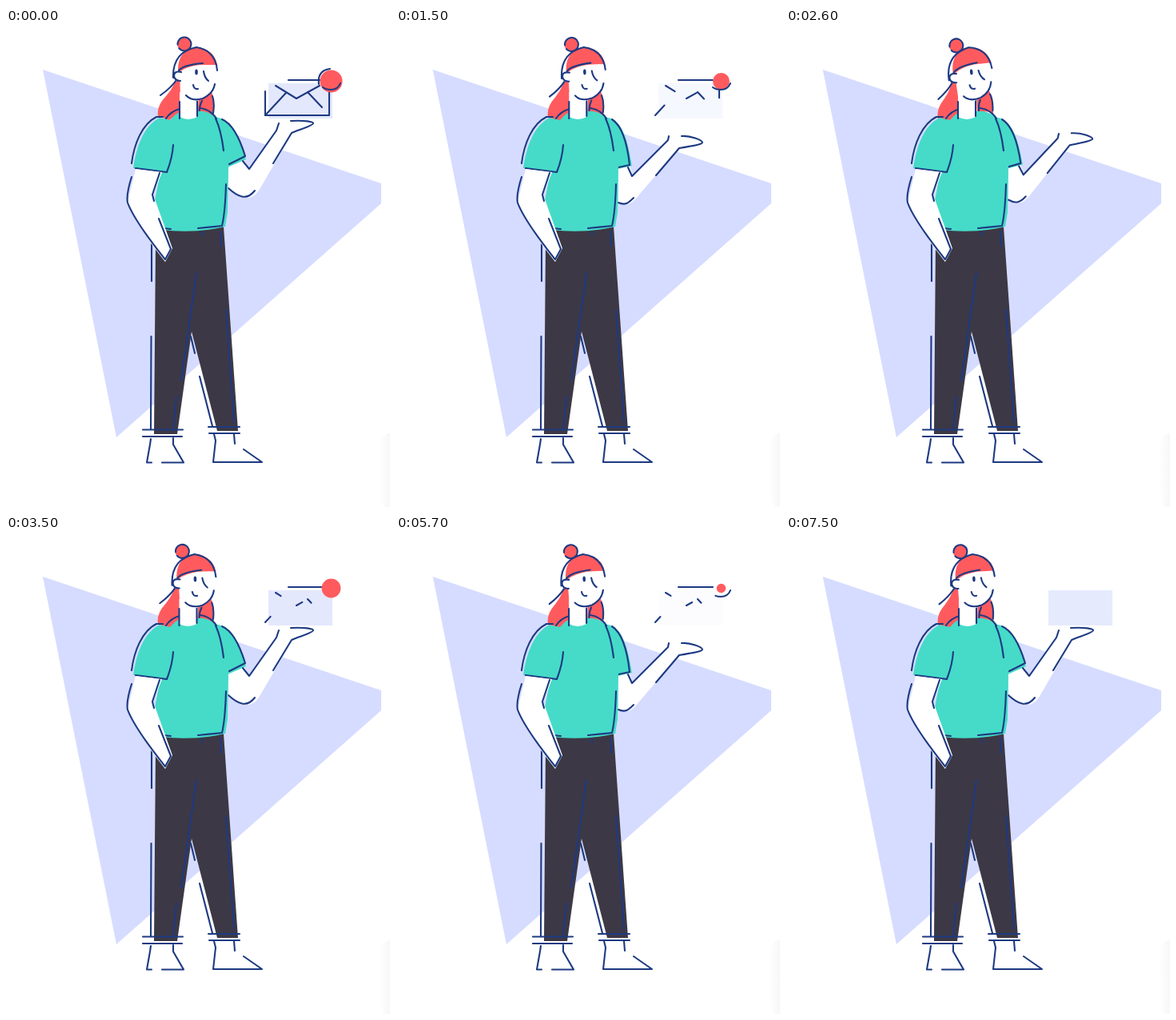
These frames come from a looping animation (480x598 px, 7.6 s). An HTML page:

```html
<!DOCTYPE html>
<html lang="en">
<head>
<meta charset="utf-8">
<title>Message in hand</title>
<style>
html, body { margin: 0; width: 100%; height: 100%; overflow: hidden; background: #fff; }
svg { display: block; width: 480px; height: 598px; }
.line { fill: none; stroke: #1d3a82; stroke-width: 2.1; stroke-linecap: round; stroke-linejoin: round; }
.teal { fill: #45dbc8; }
.red { fill: #ff5b5f; stroke: none; }
.white { fill: #fff; }
</style>
</head>
<body>
<svg viewBox="0 0 480 598">
  <defs>
    <linearGradient id="edge"><stop stop-color="#fff"/><stop offset="1" stop-color="#f7f7f7"/></linearGradient>
  </defs>
  <path fill="url(#edge)" d="M466 520Q470 508 480 505V598H472Q466 580 466 560Z"/>
  <path fill="#d6dcff" d="M46 52L469 194V219L138 511Z"/>

  <path id="armFill" class="white"/>
  <path id="sleeveFill" class="teal"/>
  <g class="line"><path id="sleeve"/><path id="forearm"/><path id="hand"/><path id="elbow"/></g>

  <!-- legs -->
  <path fill="#3d3845" d="M198 248H272L290 503H264L232 379L214 507H185L187 272Z"/>
  <path class="line" d="M182 270V316M181.500 385L181 500M238 306L219 440M213 460L209 500M231 385L236 406M242 435L258 497M275 352L285 492M245 254V259M268 254L269 272
    M171 501.500H221M171 510H220M253 498H292M254 506H292
    M181 513L180 520L176 542.500H182M209 512V520L222 542.500H195M260 507L262 515L259 542H320L297 526M285 507L286 519"/>

  <g class="head">
    <path class="red" d="M213 58Q213 70 200 85Q188 97 190 110L204 115Q212 110 219 104L222 62ZM241 86L239 110Q252 102 259 111Q262 90 257 80Z"/>
    <path class="line" d="M213 65Q206 75 193 84M258 85Q261 93 259 106M245 91Q241 98 242 108"/>
  </g>

  <!-- shirt -->
  <path class="teal" d="M205 115Q212 107 217 105L239 104Q252 102 263 113Q271 126 274 150L278 172L277 230L274 248Q235 257 194 252L186 215L193 180L159 175C163 148 172 122 192 112Z"/>
  <path class="line" d="M157 169C160 145 170 120 188 111L196 111M162 175L201 180Q208 162 209 146M262 113Q269 128 272 153M275 195Q274 230 270 247L240 250M197 250L206 251M200 113Q206 104 217 101M243 100Q256 102 263 113"/>

  <!-- resting arm -->
  <path class="white" d="M162 176L195 180L184 208L208 275L199 292L182 270L152 218Z"/>
  <path class="line" d="M157 186Q150 208 152 218Q160 240 199 289L206 276L191 238M192 181L183 208L185 216"/>

  <g id="neck">
    <path class="white" d="M217 80V111Q228 117 239 111V80Z"/>
    <path class="line" d="M217 92V113M239 91V110"/>
  </g>
  <g class="head">
    <path class="white" d="M217 50L218 86Q230 96 246 88Q260 82 263 62V44Z"/>
    <path class="red" d="M215 54Q214 28 238 24Q260 26 264 46L242 46Q226 48 218 54Z"/>
    <circle class="red" cx="223" cy="20" r="9"/>
    <circle class="white" cx="215" cy="60" r="6"/>
    <path class="line" d="M209 62Q208 30 238 24Q262 28 264 53M216 53Q222 46 246 44M219 55Q210 53 210 60Q211 66 218 66
      M247 54Q248 62 253 66M234 71Q235 77 240 76M225 84Q232 92 246 88Q259 82 261 70"/>
    <circle class="line" cx="223" cy="20" r="8.500" stroke-dasharray="43 5" transform="rotate(-150 223 20)"/>
    <ellipse cx="238" cy="55" rx="1.800" ry="3.500" fill="#1d3a82"/>
  </g>

  <!-- envelope -->
  <rect id="paper" x="328" y="69" width="80" height="44" fill="#e4e8fd"/>
  <g id="folds" class="line"></g>
  <circle id="badge" class="red" cx="406.500" cy="66.500"/>
  <g id="rim" class="line"></g>
</svg>
<script>
const $ = id => document.getElementById(id);
const LOOP = 7600, CYCLE = 4100;

// [raised, lowered] shapes of the carrying arm
const arm = {
  armFill: ['M278 172L297 164L305 177L342 121L357 116L384 119L358 131L316 203Q303 222 278 201Z',
            'M278 174L292 172L296 185L341 138L357 135L383 143L354 150L304 208Q292 226 278 218Z'],
  sleeveFill: ['M255 112C278 108 290 128 300 164L277 174L270 130Z',
               'M255 112C278 108 288 128 295 172L277 176L270 130Z'],
  sleeve: ['M270 114Q287 121 299 160L279 170', 'M270 114Q287 125 292 171L278 174'],
  forearm: ['M296 166L304 176L338 128L341 119', 'M290 174L295 185L340 140L341 135'],
  hand: ['M356 116C374 115 384 117 384 119C384 122 366 127 357 131L334 169',
         'M357 135C368 134 383 140 383 143C383 145 372 147 354 150L325 184'],
  elbow: ['M278 200C290 211 301 216 311 203', 'M278 218C287 222 291 218 297 212']
};

// path, then start and end of its erasing and of its drawing
const folds = [
  ['M404 78V109H324V79', 900, 1620, 3500, 3900],
  ['M353 65H396', 1600, 2000, 3400, 3500],
  ['M337 72L363 88', 1100, 1850, 3400, 3700],
  ['M363 88L392 72', 1100, 1850, 3400, 3700],
  ['M377 80L395 99', 1100, 1850, 3400, 3700],
  ['M324 109L350 81', 1100, 1850, 3400, 3700]
];
const rim = [
  ['M391 70Q389 53 405 51', 900, 1500, 3500, 3800],
  ['M418 69Q415 77 406 77Q400 77 396 74', 1500, 1900, 3500, 3800]
];

const addStrokes = (list, group) => list.map(([d, ...times]) => {
  const el = document.createElementNS('http://www.w3.org/2000/svg', 'path');
  el.setAttribute('d', d);
  el.setAttribute('pathLength', 1);
  group.append(el);
  return { el, times };
});
const strokes = [...addStrokes(folds, $('folds')), ...addStrokes(rim, $('rim'))];

const ramp = (t, a, b) => Math.min(1, Math.max(0, (t - a) / (b - a)));
const sine = x => (1 - Math.cos(Math.PI * x)) / 2;
const cubic = x => x < .5 ? 4 * x ** 3 : 1 - 4 * (1 - x) ** 3;
// 1 at rest, falls to 0 and later rises again
const away = (t, a, b, c, d, back = sine) => 1 - sine(ramp(t, a, b)) + back(ramp(t, c, d));

function mix(from, to, k) {
  const ends = to.match(/[\d.]+/g);
  let i = 0;
  return from.replace(/[\d.]+/g, n => (+n + (ends[i++] - n) * k).toFixed(2));
}

function draw(now) {
  const t = now % LOOP % CYCLE;

  const lowered = 1 - away(t, 850, 1450, 2200, 3300, cubic);
  for (const id in arm) $(id).setAttribute('d', mix(...arm[id], lowered));

  const turn = 1 - away(t, 900, 2400, 2900, 3900, cubic);
  for (const el of document.querySelectorAll('.head'))
    el.setAttribute('transform', `rotate(${-6.5 * turn} 235 110)`);
  $('neck').setAttribute('transform', `translate(${-2 * turn} 0)`);

  $('paper').setAttribute('opacity', away(t, 1100, 1750, 3000, 3500));
  $('badge').setAttribute('r', 14 * away(t, 1350, 1800, 3400, 3535));
  for (const { el, times } of strokes) {
    const shown = away(t, ...times);
    el.style.display = shown > .005 ? '' : 'none';
    el.style.strokeDasharray = shown > .995 ? 'none' : `${shown} 2`;
  }
}

const start = performance.now();
(function tick() {
  draw(performance.now() - start);
  requestAnimationFrame(tick);
})();
</script>
</body>
</html>
```
